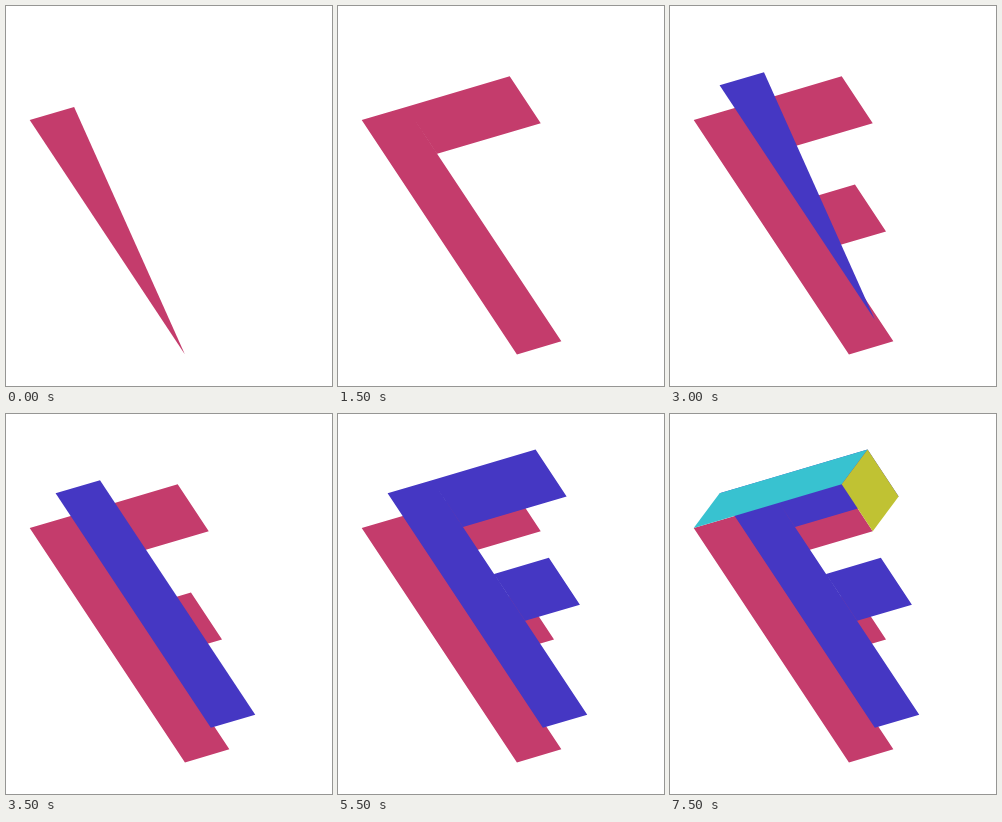
These frames come from a looping animation (326x380 px, 8000 ms). An HTML page:

```html
<!DOCTYPE html>
<html lang="en">
<head>
<meta charset="utf-8">
<title>Building a 3D letter F</title>
<style>
  html, body { margin: 0; width: 100%; height: 100%; overflow: hidden; background: #fff; }
  svg { display: block; width: 326px; height: 380px; }
</style>
</head>
<body>
<svg viewBox="0 0 326 380">
  <path id="front" fill="#c43c6c"/>
  <path id="back" fill="#4537c3"/>
  <path id="top" fill="#38c2d0"/>
  <path id="right" fill="#c0c233"/>
</svg>
<script>
const STEP = 500;
const LOOP = 8000;

// Orthographic projection of model space onto the stage.
const project = ([x, y, z]) => [
  23.7 + 1.48 * x + 1.035 * y + 0.863 * z,
  114 - 0.437 * x + 1.563 * y - 1.157 * z
].map(v => v.toFixed(2)).join(' ');

// Corners run so that the first three form the first triangle.
const rect = (x0, y0, x1, y1, z) =>
  [[x0, y1, z], [x0, y0, z], [x1, y0, z], [x1, y1, z]];

const letter = z => [
  rect(0, 0, 30, 150, z),
  rect(30, 0, 100, 30, z),
  rect(30, 60, 67, 90, z)
];

const faces = [
  ['front', letter(0)],
  ['back', letter(30)],
  ['top', [[[100, 0, 30], [100, 0, 0], [0, 0, 0], [0, 0, 30]]]],
  ['right', [[[100, 0, 0], [100, 30, 0], [100, 30, 30], [100, 0, 30]]]]
].map(([id, quads]) => ({
  path: document.getElementById(id),
  quads: quads.map(quad => quad.map(project))
}));

// Each quad takes two triangles: three corners, then all four.
function draw(time) {
  let triangles = Math.floor((time % LOOP) / STEP) + 1;
  for (const { path, quads } of faces) {
    let d = '';
    for (const quad of quads) {
      if (triangles > 0) d += `M${quad.slice(0, triangles > 1 ? 4 : 3).join('L')}Z`;
      triangles -= 2;
    }
    path.setAttribute('d', d);
  }
}

const start = performance.now();
function tick() {
  draw(performance.now() - start);
  requestAnimationFrame(tick);
}
tick();
</script>
</body>
</html>
```
